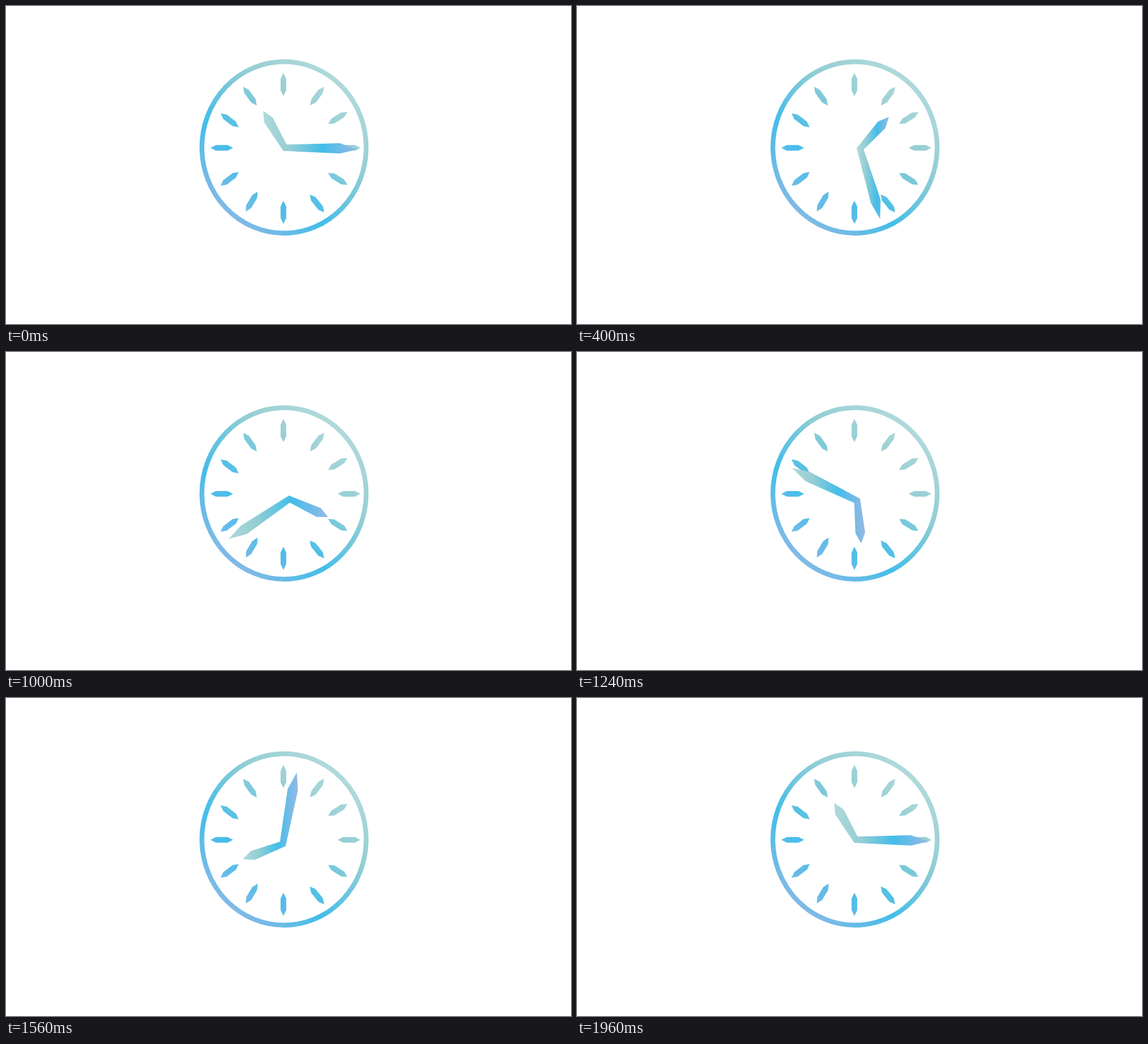
These frames come from a looping animation (998 by 561 pixels, 2 s). An HTML page:

```html
<!DOCTYPE html>
<html lang="en">
<head>
<meta charset="utf-8">
<title>Clock</title>
<style>
  html, body { margin: 0; width: 100%; height: 100%; overflow: hidden; background: #fff; }
  svg { display: block; width: 100vw; height: 100vh; }
</style>
</head>
<body>
<svg viewBox="0 0 998 561">
  <defs>
    <linearGradient id="tones">
      <stop offset="0" stop-color="#b0d9db"/>
      <stop offset=".28" stop-color="#94ced3"/>
      <stop offset=".63" stop-color="#43bde9"/>
      <stop offset="1" stop-color="#96b9e5"/>
    </linearGradient>
    <linearGradient id="face" href="#tones" gradientUnits="userSpaceOnUse" x1="593" y1="134" x2="370" y2="387"/>
  </defs>
  <ellipse cx="491.1" cy="249.5" rx="145.1" ry="151.3" fill="none" stroke="url(#face)" stroke-width="8.4"/>
  <path id="marks" fill="url(#face)"/>
  <!-- the gradient spans the bounding box of the current pose -->
  <polygon id="hands" fill="url(#tones)"/>
</svg>
<script>
const $ = id => document.getElementById(id);

// outer and inner tip of each hour mark
const marks = [
  [490, 118, 490, 159], [562, 142.5, 537, 175.5], [603, 187, 569, 208],
  [626, 250.3, 586, 250.3], [603, 315.5, 569, 294.5], [562, 364, 536.5, 332.5],
  [490, 384.5, 490, 343.5], [423.5, 362.5, 444.5, 327.5], [379, 317, 411, 293],
  [361, 250.3, 401, 250.3], [379, 189.5, 411, 214], [419, 142.5, 443, 175.5]
];

function markPath([x1, y1, x2, y2]) {
  const len = Math.hypot(x2 - x1, y2 - y1);
  const ux = (x2 - x1) / len, uy = (y2 - y1) / len;
  const at = (along, side) =>
    [(x1 + x2) / 2 + ux * along - uy * side, (y1 + y2) / 2 + uy * along + ux * side];
  return 'M' + [at(-len / 2, 0), at(-10.3, 5), at(10.3, 5),
    at(len / 2, 0), at(10.3, -5), at(-10.3, -5)].join('L') + 'Z';
}
$('marks').setAttribute('d', marks.map(markPath).join(''));

const CX = 495.2, CY = 256, TURN = 1960, LOOP = 2000, STEP = 40;
const shape = [[-41, -71], [-24.2, -59.2], [.5, -11.5], [94.3, -14],
  [126, -3], [95, 4.3], [-5.5, -.4], [-39, -50.4]];

// time in ms, rotation in degrees
const keys = [[0, 0], [400, 72.8], [560, 90], [720, 108.6], [1000, 145.4],
  [1120, 171], [1240, 205.3], [1560, 279.8], [1680, 303], [TURN, 360]];
const last = keys.length - 1;

function slope(i) {
  const [t0, a0] = i > 0 ? keys[i - 1] : [keys[last - 1][0] - TURN, keys[last - 1][1] - 360];
  const [t1, a1] = i < last ? keys[i + 1] : [keys[1][0] + TURN, keys[1][1] + 360];
  const [t, a] = keys[i], before = t - t0, after = t1 - t;
  return ((a - a0) / before * after + (a1 - a) / after * before) / (before + after);
}

function angle(t) {
  let i = 0;
  while (i < last - 1 && t > keys[i + 1][0]) i++;
  const [t0, a0] = keys[i], [t1, a1] = keys[i + 1];
  const d = t1 - t0, s = (t - t0) / d, r = 1 - s;
  return a0 * r * r * (1 + 2 * s) + a1 * s * s * (3 - 2 * s)
    + d * s * r * (slope(i) * r - slope(i + 1) * s);
}

function draw(now) {
  const t = Math.floor(now % LOOP / STEP) * STEP;
  const a = angle(t) * Math.PI / 180, c = Math.cos(a), s = Math.sin(a);
  $('hands').setAttribute('points',
    shape.map(([x, y]) => [CX + x * c - y * s, CY + x * s + y * c]).join(' '));
}

const start = performance.now();
function tick() {
  draw(performance.now() - start);
  requestAnimationFrame(tick);
}
tick();
</script>
</body>
</html>
```
